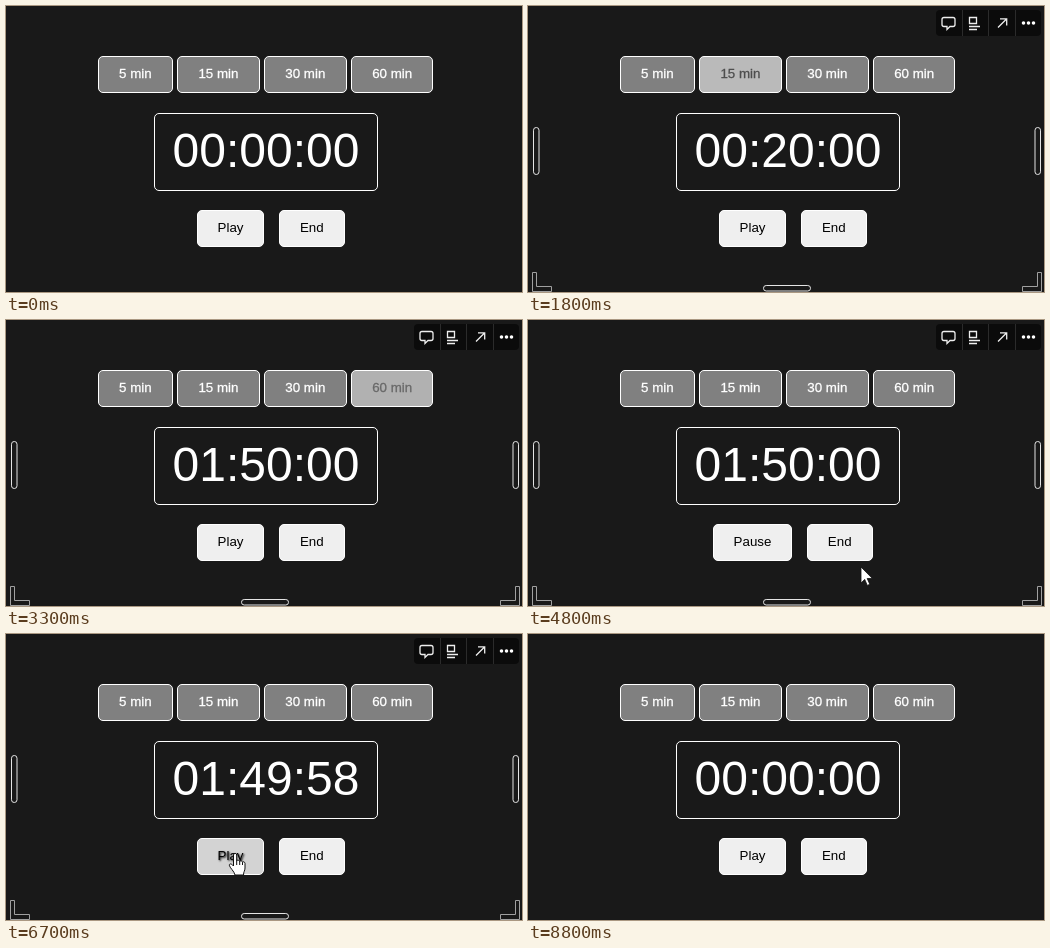
Write an HTML page that moves like this. It is 516 by 286 pixels and loops after 9100 ms.

```html
<!DOCTYPE html>
<html lang="en">
<head>
<meta charset="utf-8">
<title>Countdown timer</title>
<style>
html, body { margin: 0; width: 100%; height: 100%; overflow: hidden; background: #191919; }
body { position: relative; font: 16px "Liberation Sans", Arial, sans-serif; cursor: default; }
.row { position: absolute; left: 0; width: 519.2px; text-align: center; white-space: nowrap; }
.btn {
  display: inline-block; box-sizing: border-box; height: 37px; padding: 9px 20.2px;
  border: 1px solid #fff; border-radius: 5px; font-size: 13.333px; line-height: 15px;
  -webkit-text-stroke: .3px;
}
.control { margin-left: 10px; padding: 9px 20px; -webkit-text-stroke: 0; }
#timer {
  position: absolute; box-sizing: border-box; left: 148px; top: 107px; width: 224px; height: 78px;
  border: 1px solid #fff; border-radius: 5px; color: #fff;
  font-size: 48px; line-height: 73px; text-align: center;
}
svg { position: absolute; left: 0; top: 0; }
</style>
</head>
<body>
<div class="row" style="top:50px">
  <span class="btn">5 min</span>
  <span class="btn">15 min</span>
  <span class="btn">30 min</span>
  <span class="btn">60 min</span>
</div>
<div id="timer"></div>
<div class="row" style="top:204px">
  <span class="btn control">Play</span>
  <span class="btn control">End</span>
</div>
<svg width="516" height="286" fill="none">
  <defs>
    <g id="side">
      <rect x="5.5" y="121.5" width="5.5" height="47" rx="2.7" stroke="#e4e4e4"/>
      <path d="M4.5 266.5h4v14h15v5h-19z" stroke="#a0a0a0"/>
    </g>
  </defs>
  <g id="chrome">
    <use href="#side"/>
    <use href="#side" transform="matrix(-1 0 0 1 518 0)"/>
    <rect x="235.5" y="279.5" width="47" height="5.5" rx="2.7" stroke="#e4e4e4"/>
    <rect x="408" y="4" width="105" height="26" rx="4" fill="#0b0b0b"/>
    <path d="M434.5 4v26M460.5 4v26M487.5 4v26" stroke="#2b2b2b"/>
    <g stroke="#eee" stroke-width="1.3">
      <path d="M416 11.5h9q2 0 2 2v5q0 2-2 2h-3l-3 3v-3h-3q-2 0-2-2v-5q0-2 2-2z"/>
      <path d="M441.5 11.5h7v6h-7zM441 20.5h11M441 23.5h8"/>
      <path d="M470 21.5l8.5-8.5M472 12.8h6.7v6.7"/>
    </g>
    <path d="M495.5 17h.01M500.5 17h.01M505.5 17h.01" stroke="#fff" stroke-width="3.6" stroke-linecap="round"/>
  </g>
  <g id="pointer" fill="#fff" stroke="#111" stroke-linejoin="round">
    <path id="arrow" d="M0 0v16l3.7-3.6 2.6 6 2.5-1.1-2.6-5.8h5.2z" stroke-width=".8"/>
    <g id="hand" transform="translate(-6.5 0)">
      <path d="M5 13V2a1.6 1.6 0 0 1 3.2 0V8c0-1.2 3-1 3 .6 0-1.2 2.8-.8 2.8.7 0-1 2.5-.6 2.5 1V15c0 3-1.5 3.5-1.5 7H6.5C6 18.5 1 14.5.8 12.2c0-1.8 2.2-1.8 4.2.8z"/>
      <path d="M8.2 8v4M11.2 8.6V12M14 9.3V12"/>
    </g>
  </g>
</svg>
<script>
const LOOP = 9100, STEP = 100, FADE = 300;
const CLICK_LEAD = 300;  // a click comes this long before the pointer leaves
const BLINK = 150;       // the pointer vanishes briefly after leaving a button
const PLAY = 4, END = 5;
const $ = id => document.getElementById(id);
const buttons = [...document.querySelectorAll(".btn")];
const minutes = buttons.slice(0, PLAY).map(button => parseInt(button.textContent));

const waypoint = (x, y, enter, leave = enter) => ({ x, y, enter, leave, lift: 0 });
const visit = (button, x, enter, leave, lift = 0) =>
  ({ button, x, y: button < PLAY ? 66 : 219, enter, leave, lift, click: leave - CLICK_LEAD });

const stops = [
  waypoint(130, 292, 0, 200),
  visit(0, 146, 600, 1300),
  visit(1, 215, 1400, 1750),
  visit(2, 304, 1850, 2490),
  visit(3, 385, 2700, 3230),
  visit(PLAY, 229, 3500, 4100),
  waypoint(355, 236, 4500),
  waypoint(333, 247, 4800),
  waypoint(279, 263, 5100, 5200),
  visit(PLAY, 229, 5600, 7000),
  visit(END, 312, 7600, 8400, 26),
  waypoint(330, 292, 8800, LOOP)
];
const visits = stops.filter(stop => "button" in stop);
const [playAt, pauseAt] = visits.filter(v => v.button === PLAY).map(v => v.click);
const endAt = visits.find(v => v.button === END).click;

const clamp = v => Math.min(1, Math.max(0, v));
const easeOut = p => 1 - (1 - clamp(p)) ** 2;
const smooth = p => p * p * (3 - 2 * p);
const mix = (a, b, p) => a + (b - a) * p;
const gray = v => `rgb(${v},${v},${v})`;
const within = (t, from, to) => t >= from && t < to;

function secondsLeft(t) {
  if (t >= endAt) return 0;
  const added = visits.reduce((sum, v) => sum + (v.button < PLAY && v.click <= t ? minutes[v.button] * 60 : 0), 0);
  const ran = Math.min(t, pauseAt) - playAt;
  return added - Math.max(0, Math.ceil(ran / 1000) - 1);
}

const clock = s => [s / 3600, s / 60 % 60, s % 60]
  .map(v => String(Math.floor(v)).padStart(2, "0")).join(":");

function pointerAt(t) {
  const i = stops.findIndex(stop => t <= stop.leave);
  const to = stops[i], from = stops[i - 1] || to;
  if (t >= to.enter) return [to.x, to.y];
  const p = smooth((t - from.leave) / (to.enter - from.leave));
  return [mix(from.x, to.x, p), mix(from.y, to.y, p) - to.lift * Math.sin(Math.PI * p)];
}

function hoverAmount(index, t) {
  return Math.max(0, ...visits.filter(v => v.button === index)
    .map(v => easeOut((t - v.enter) / FADE) * (1 - easeOut((t - v.leave) / FADE))));
}

function render(t) {
  $("timer").textContent = clock(secondsLeft(t));
  buttons[PLAY].textContent = within(t, playAt, pauseAt) ? "Pause" : "Play";

  const hovered = visits.find(v => within(t, v.enter, v.leave));
  buttons.forEach((button, i) => {
    const amount = hoverAmount(i, t), control = i >= PLAY;
    button.style.background = gray(mix(control ? 239 : 128, 211, amount));
    button.style.color = gray(control ? 0 : mix(255, 0, amount));
    button.style.textShadow = hovered && hovered.button === i ? "1px 1px 2px #000" : "none";
  });

  $("chrome").style.opacity = clamp((t - 200) / 200) * clamp((8800 - t) / 200);

  $("pointer").setAttribute("transform", `translate(${pointerAt(t)})`);
  $("pointer").style.display = visits.some(v => within(t, v.leave, v.leave + BLINK)) ? "none" : "";
  $("hand").style.display = hovered ? "" : "none";
  $("arrow").style.display = hovered ? "none" : "";
}

const start = performance.now();
function tick() {
  const t = (performance.now() - start) % LOOP;
  render(Math.floor(t / STEP) * STEP);
  requestAnimationFrame(tick);
}
tick();
</script>
</body>
</html>
```
